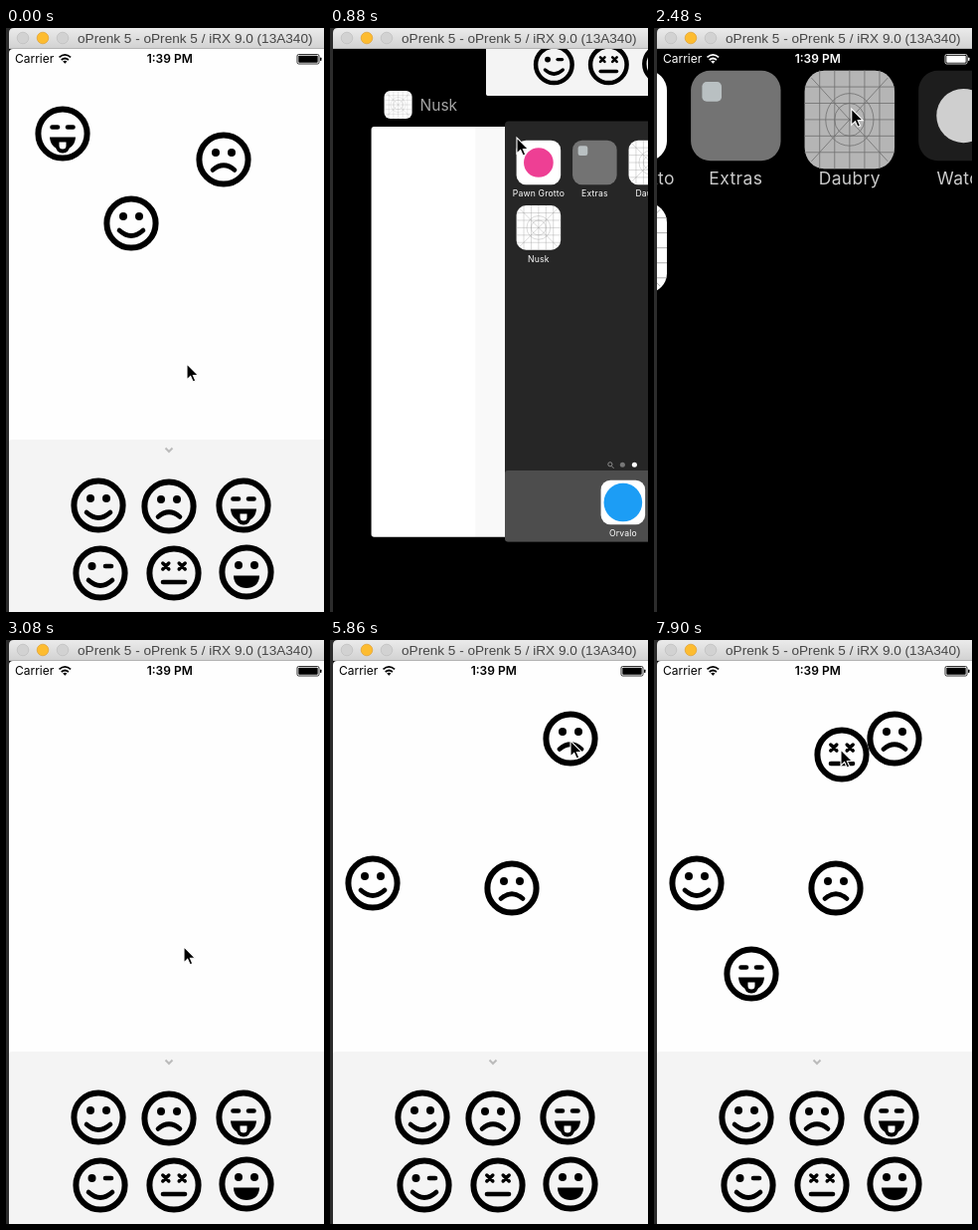
These frames come from a looping animation (320 by 586 pixels, 8000 ms). An HTML page:

```html
<!DOCTYPE html>
<html lang="en">
<head>
<meta charset="utf-8">
<title>Face board</title>
<style>
html, body { margin: 0; width: 100%; height: 100%; overflow: hidden; background: #000; }
svg { display: block; width: 100vw; height: 100vh; }
text { font-family: Inter, Roboto, sans-serif; }
.title { font-family: "Liberation Sans", Arial, sans-serif; font-size: 13.6px; fill: #464646; }
.label { font-size: 11.6px; letter-spacing: .25px; fill: #fff; text-anchor: middle; opacity: var(--label); }
.line { fill: none; stroke: #000; stroke-width: 4.6; stroke-linecap: round; }
.cross { stroke-width: 3.5; }
.grid { fill: none; stroke: #999; stroke-width: .5; }
</style>
</head>
<body>
<svg id="stage" viewBox="0 0 320 586"></svg>
<script>
const LOOP = 8000, STEP = 146.4;
const stage = document.getElementById('stage');

// ---------- drawing helpers ----------
const at = (x, y, body) => `<g transform="translate(${x} ${y})">${body}</g>`;
const dot = (x, y, r, fill = '#000') => `<circle cx="${x}" cy="${y}" r="${r}" fill="${fill}"/>`;
const box = (x, y, w, h, fill, r = 0) =>
  `<rect x="${x}" y="${y}" width="${w}" height="${h}" rx="${r}" fill="${fill}"/>`;
const line = (d, extra = '') => `<path class="line ${extra}" d="${d}"/>`;

const eyes = dot(-8, -7, 4) + dot(8, -7, 4);
const smile = line('M-12 7Q0 18 12 7');
const features = {
  smile: eyes + smile,
  sad: eyes + line('M-11 10.5Q0 1 11 10.5'),
  tongue: line('M-10.5-6.5h5.5M5-6.5h5.5') +
    '<path d="M-13 3.5H13C12.5 10 9 14.5 4 15.5H-4C-9 14.5-12.5 10-13 3.5Z"/>' +
    box(-7, 6, 14, 13.5, '#000', 6.5) +
    '<path fill="#fff" d="M-3.5 8.5h7v3.500a3.5 3.5 0 0 1-7 0Z"/>',
  wink: dot(-8.5, -7, 4) + line('M5-7h6') + smile,
  dizzy: line('M-11.2-10l6 6m0-6l-6 6M5.2-10l6 6m0-6l-6 6', 'cross') + line('M-11 9H11'),
  grin: eyes + '<path d="M-13 3.5H13C13 12 7 16 0 16S-13 12-13 3.5Z"/>'
};
const face = type =>
  `<circle r="24.6" fill="none" stroke="#000" stroke-width="6"/>${features[type]}`;

const status = color => `<g fill="${color}">
  <text x="9" y="35.3" font-size="12">Carrier</text>
  <text x="164.7" y="35.3" font-size="12" font-weight="600" text-anchor="middle">1:39 PM</text>
  <path d="M53.5 29.3Q59.3 24.5 65.1 29.3M55.7 32Q59.3 29 62.9 32"
    fill="none" stroke="${color}" stroke-width="1.7"/>
  <path d="M57.2 33.6Q59.3 32 61.4 33.6L59.3 35.8Z"/>
  <rect x="293" y="26.5" width="22" height="9.5" rx="1.5" fill="none" stroke="${color}" stroke-width=".8"/>
  ${box(294.3, 27.8, 19.4, 6.9, color, .8)}${box(316, 29.5, 1.5, 3.5, color, .7)}</g>`;

const tile = (fill, body = '') => box(-30, -30, 60, 60, fill, 13) + body;
const gridTile = () => {
  let d = 'M-25.5-25.5l51 51m0-51l-51 51';
  for (let i = -2; i <= 2; i++) d += `M${i * 10}-30v60M-30 ${i * 10}h60`;
  return tile('#fff', `<g class="grid"><path d="${d}"/><circle r="10"/><circle r="16"/></g>`);
};

// ---------- screens, laid out at full size from (3, 21) ----------
const tray = [['smile', 93, 479], ['sad', 164, 480], ['tongue', 239, 479],
  ['wink', 95, 547], ['dizzy', 169, 547], ['grin', 242, 546]];
const oldFaces = [['tongue', 57, 106], ['sad', 219, 132], ['smile', 126, 196]];
const put = list => list.map(([type, x, y]) => at(x, y, face(type))).join('');

// Each face follows the pointer from one step to another, held off centre by (dx, dy).
const drags = [
  { type: 'sad', from: 25, to: 28, dx: 0, dy: 0 },
  { type: 'smile', from: 30, to: 32, dx: 1, dy: 19 },
  { type: 'sad', from: 35, to: 40, dx: 0, dy: -2 },
  { type: 'tongue', from: 44, to: 48, dx: 3, dy: -8 },
  { type: 'dizzy', from: 51, to: 54, dx: 1, dy: 5 }
];

const appView = box(3, 21, 320, 568, '#fefefe', 4) + box(3, 413, 320, 176, '#f4f4f4', 3) +
  '<path d="M160.5 421.5l3.5 3.5 3.5-3.5" fill="none" stroke="#bbb" stroke-width="2"/>' +
  status('#000') + put(tray) + `<g id="old">${put(oldFaces)}</g>` +
  drags.map((d, i) => `<g id="drag${i}">${face(d.type)}</g>`).join('');

const icon = (col, y, art, name) =>
  at(48.6 + 76 * col, y, art + `<text class="label" y="46">${name}</text>`);

const homeView = box(-37, 21, 50, 568, 'rgba(0,0,0,.025)') +
  '<rect id="homeBg" x="3" y="21" width="320" height="568" rx="5"/>' +
  icon(0, 77, tile('#fff', dot(0, 0, 20, '#ee3f94')), 'Pawn Grotto') +
  icon(1, 77, tile('#737373', box(-22.5, -22.5, 13, 13, '#b9c0c2', 3)), 'Extras') +
  icon(2, 77, `<g id="pick">${gridTile()}<g id="shade">${tile('#000')}</g></g>`, 'Daubry') +
  icon(3, 77, tile('#1d1d1d', dot(0, 0, 18, '#cfcfcf')), 'Watch') +
  icon(0, 165, gridTile(), 'Nusk') +
  `<g fill="none" stroke="#999" stroke-width="1.2">
    <path d="M147.5 487l3 3"/><circle cx="145.5" cy="484.5" r="2.8"/></g>` +
  dot(162.3, 485, 3.4, '#777') + dot(178.5, 485, 3.4, '#fff') +
  box(3, 493, 320, 96, '#4d4d4d', 4) +
  icon(1.505, 536, tile('#fff', dot(0, 0, 26, '#1c9df5')), 'Orvalo');

const header = name => at(27, -22, `<g transform="scale(.467)">${gridTile()}</g>
  <text x="22" y="5.5" font-size="15.5" fill="#a4a4a4">${name}</text>`);

stage.innerHTML = `
<defs>
  <linearGradient id="bar" x2="0" y2="1">
    <stop stop-color="#ebebeb"/><stop offset="1" stop-color="#d1d1d1"/></linearGradient>
  <clipPath id="screen"><rect x="3" y="21" width="317" height="565"/></clipPath>
</defs>
${box(0, 0, 320, 586, '#2c2c2c')}
<g clip-path="url(#screen)">
  ${box(3, 21, 317, 565, '#000')}
  <g id="back"><g id="backCard">${box(3, 21, 320, 568, '#fff', 4)}</g><g id="backHead">${header('Nusk')}</g></g>
  <g id="home">${homeView}</g>
  <g id="homeBar">${status('#fff')}</g>
  <g id="appHead">${header('Daubry')}</g>
  <g id="app">${appView}</g>
</g>
<path d="M3 21V5Q3 0 8 0H320V21Z" fill="url(#bar)"/>
${box(3, 20, 317, 1, '#b3b3b3')}
<g stroke="#bdbdbd" stroke-width=".7">${dot(17, 10, 5.8, '#d2d2d2')}${dot(57, 10, 5.8, '#d2d2d2')}</g>
<g stroke="#e0a032" stroke-width=".7">${dot(37, 10, 5.8, '#fdbc30')}</g>
<text class="title" x="72" y="15">oPrenk 5 - oPrenk 5 / iRX 9.0 (13A340)</text>
<path id="pointer" d="M0 0V16L3.7 12.5 6.2 18 8.8 17 6.4 11.5H11.5Z" stroke="#fff" stroke-width="1.1"/>`;

const el = {};
stage.querySelectorAll('[id]').forEach(node => el[node.id] = node);

// ---------- motion, timed in steps ----------
const clamp = (v, lo, hi) => Math.min(hi, Math.max(lo, v));
const ramp = (k, from, to) => clamp((k - from) / (to - from), 0, 1);
const easeOut = p => 1 - (1 - p) ** 2;
const smooth = p => p * p * (3 - 2 * p);
const mix = (a, b, p) => a.map((v, i) => v + (b[i] - v) * p);

// Places the hand goes to: step of arrival, x, y.
const stops = [
  [0, 182, 337], [6, 188, 110], [11, 231.5, 306], [16, 200, 67], [25, 164, 480],
  [28, 183, 249], [30, 92, 460], [32, 42, 225], [35, 164, 482], [39, 242, 95],
  [40, 242, 101], [43, 249, 528], [44, 236, 487], [48, 95, 343], [50, 176, 548],
  [51, 168, 542], [54, 141, 154]
];
function pointerAt(k) {
  const i = clamp(stops.findIndex(s => s[0] > k), 1, stops.length);
  const [from, ...a] = stops[i - 1], [to, ...b] = stops[i] || stops[i - 1];
  return to > from ? mix(a, b, smooth(ramp(k, from, to))) : a;
}

// Poses are x, y, scale.
const FULL = [3, 21, 1], CARD = [157, 94, .743], HOME_CARD = [156, 93.4, .743], BACK_CARD = [30, 99, .725];

function move(node, x, y) {
  node.setAttribute('transform', `translate(${x} ${y})`);
}
function pose(node, [x, y, s]) {
  node.setAttribute('transform', `translate(${x} ${y}) scale(${s}) translate(-3 -21)`);
}
function fade(node, v) {
  node.style.opacity = v;
  node.style.display = v > 0 ? '' : 'none';
}

// The open app shrinks to a card, is flicked away, and is launched anew.
function drawApp(k) {
  const launch = ramp(k, 17, 19);
  let p = mix(FULL, CARD, ramp(k, 0, 2));
  if (launch) p = mix([105, 40, .4], FULL, easeOut(launch));
  else p[1] -= 112 * Math.max(0, k - 4) ** 2;
  pose(el.app, p);
  fade(el.app, k < 8 ? 1 : easeOut(launch));
  move(el.appHead, p[0], p[1]);
  fade(el.appHead, k > 1 && k < 6 ? 1 : 0);
}

// The home card slides in, opens to full size, then zooms into the chosen icon.
function drawHome(k, slide, open) {
  const zoom = .507 * Math.max(0, k - 16) ** 2;
  const p = mix(HOME_CARD, FULL, open);
  p[0] += 180 * (1 - slide) - 205 * zoom;
  p[1] -= 34.3 * zoom;
  p[2] += zoom;
  pose(el.home, p);
  fade(el.home, k < 18 ? 1 : ramp(k, 19, 17.5));
  const grey = Math.round(38 * (1 - open));
  el.homeBg.setAttribute('fill', `rgb(${grey},${grey},${grey})`);
  pose(el.homeBar, zoom ? FULL : p);
  fade(el.homeBar, k < 18 ? open : 0);
  fade(el.shade, k > 15 ? .29 : 0);
  el.pick.setAttribute('transform', zoom ? 'translate(0 2.6) scale(1 1.09)' : '');
  stage.style.setProperty('--label', 1 - .4 * Math.min(1, zoom));
}

// The card behind grows, blurs and darkens as the home card opens.
function drawBack(slide, open) {
  const p = mix(BACK_CARD, FULL, open);
  p[0] += 13 * slide * (1 - open);
  pose(el.backCard, p);
  move(el.backHead, p[0], p[1]);
  fade(el.back, 1 - open);
  el.backHead.querySelector('text').style.opacity = 1 - Math.min(1, open * 1.5);
  el.back.style.filter = open ? 'blur(2px)' : 'none';
}

function drawFaces(k) {
  fade(el.old, k < 9 ? 1 : 0);
  drags.forEach((d, i) => {
    const [x, y] = pointerAt(clamp(k, d.from, d.to));
    move(el['drag' + i], x + d.dx, y + d.dy);
    fade(el['drag' + i], k >= d.from ? 1 : 0);
  });
}

function render(ms) {
  const k = Math.floor((ms % LOOP + 12) / STEP);
  const slide = easeOut(ramp(k, 4, 7)), open = easeOut(ramp(k, 10, 13.15));
  const settled = k > 13 ? 1 : open;
  drawApp(k);
  drawHome(k, slide, settled);
  drawBack(slide, settled);
  drawFaces(k);
  move(el.pointer, ...pointerAt(k));
}

const start = performance.now();
function tick() {
  render(performance.now() - start);
  requestAnimationFrame(tick);
}
tick();
</script>
</body>
</html>
```
